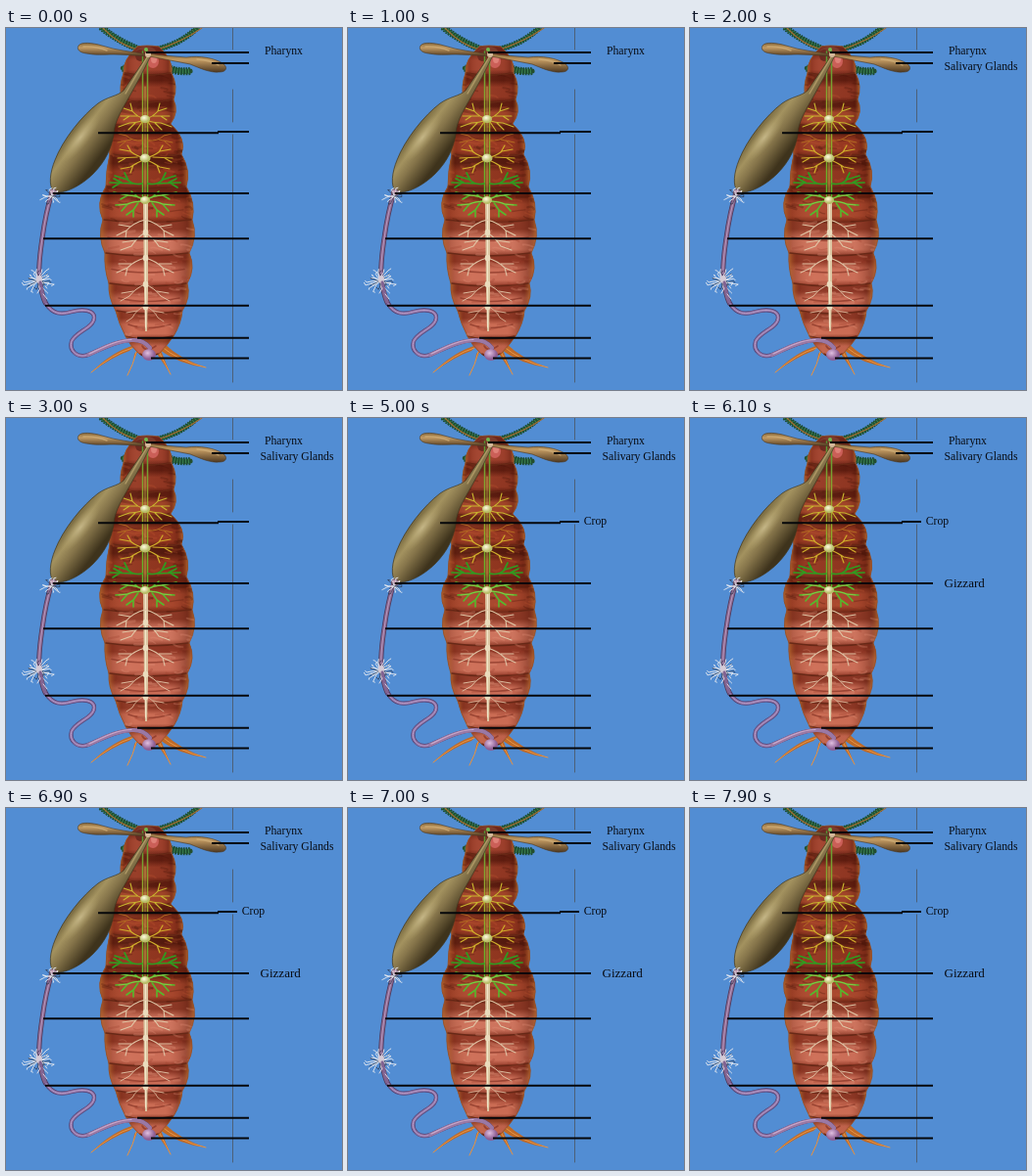
Write an HTML page that moves like this. It is 343 by 370 pixels and loops after 8000 ms.

```html
<!DOCTYPE html>
<html lang="en">
<head>
<meta charset="utf-8">
<title>Insect anatomy</title>
<style>
html, body { margin: 0; width: 100%; height: 100%; overflow: hidden; background: #528dd3; }
svg { display: block; width: 343px; height: 370px; }
path { stroke-linecap: round; stroke-linejoin: round; }
text { font: 11.7px "Liberation Serif", "Times New Roman", serif; fill: #080c14; }
</style>
</head>
<body>
<svg viewBox="0 0 343 370" xmlns="http://www.w3.org/2000/svg">
  <defs>
    <linearGradient id="side" x1="0" x2="1" y1="0" y2="0">
      <stop offset="0" stop-color="#b5682c" stop-opacity=".85"/>
      <stop offset=".09" stop-color="#7a2a14" stop-opacity=".3"/>
      <stop offset=".3" stop-color="#e08060" stop-opacity=".12"/>
      <stop offset=".75" stop-color="#a04028" stop-opacity=".05"/>
      <stop offset=".92" stop-color="#5c1c0c" stop-opacity=".4"/>
      <stop offset="1" stop-color="#b5682c" stop-opacity=".85"/>
    </linearGradient>
    <linearGradient id="sac" gradientUnits="userSpaceOnUse" x1="68" y1="100" x2="101" y2="125">
      <stop offset="0" stop-color="#6d5f38"/>
      <stop offset=".3" stop-color="#a3925f"/>
      <stop offset=".55" stop-color="#85744a"/>
      <stop offset="1" stop-color="#3e331c"/>
    </linearGradient>
    <radialGradient id="shine">
      <stop offset="0" stop-color="#d0c294" stop-opacity=".75"/>
      <stop offset="1" stop-color="#b3a26c" stop-opacity="0"/>
    </radialGradient>
    <linearGradient id="gland" x1="0" x2="0" y1="0" y2="1">
      <stop offset="0" stop-color="#8c6c3c"/>
      <stop offset=".35" stop-color="#c29a62"/>
      <stop offset="1" stop-color="#4e3820"/>
    </linearGradient>
    <linearGradient id="cord" gradientUnits="userSpaceOnUse" x1="0" y1="20" x2="0" y2="185">
      <stop offset="0" stop-color="#4e9a36"/>
      <stop offset=".45" stop-color="#a3a82c"/>
      <stop offset="1" stop-color="#48b526"/>
    </linearGradient>
    <radialGradient id="node" cx=".4" cy=".35">
      <stop offset="0" stop-color="#fffbe0"/>
      <stop offset="1" stop-color="#b9bd68"/>
    </radialGradient>
    <radialGradient id="end" cx=".4" cy=".35">
      <stop offset="0" stop-color="#e0bfe0"/>
      <stop offset="1" stop-color="#8d5f95"/>
    </radialGradient>
    <clipPath id="trunk"></clipPath>
  </defs>
  <g id="art"></g>
  <g id="leaders" stroke="#05070a" stroke-width="1.9"></g>
  <g id="labels"></g>
</svg>
<script>
const byId = id => document.getElementById(id);
let seed = 17;
const rnd = () => (seed = (seed * 16807) % 2147483647) / 2147483647;
const span = (a, b) => a + (b - a) * rnd();

const out = [];
const fill = (d, c, extra = '') => out.push(`<path d="${d}" fill="${c}" ${extra}/>`);
const line = (d, c, w, extra = '') =>
  out.push(`<path d="${d}" fill="none" stroke="${c}" stroke-width="${w}" ${extra}/>`);
const ball = (x, y, rx, ry, c) =>
  out.push(`<ellipse cx="${x}" cy="${y}" rx="${rx}" ry="${ry}" fill="${c}"/>`);

// Feathery green appendages
function feather(d, w) {
  line(d, '#24502f', w * .65);
  line(d, '#1c4c30', w, 'style="stroke-linecap:butt" stroke-dasharray="1.7 1"');
  line(d, '#3c8050', w * .55, 'style="stroke-linecap:butt" stroke-dasharray="1 1.9"');
}
feather('M97 -1Q112 12 136 22', 7);
feather('M152 22Q178 17 196 -1', 6);
feather('M119 41Q127 43 139 35', 7);
feather('M153 35Q170 46 188 44', 8);
line('M134 22Q115 17 99 0', '#a86c32', 1.1);
line('M152 23Q180 14 200 0', '#a86c32', 1.1);

// Tail spikes
function spike(x0, y0, cx, cy, x1, y1, w) {
  fill(`M${x0 - w} ${y0 + w}Q${cx} ${cy + w} ${x1} ${y1}Q${cx} ${cy - w} ${x0 + w} ${y0 - w}Z`, '#c06a26');
  line(`M${x0} ${y0}Q${cx} ${cy} ${x1} ${y1}`, '#e3954a', 1);
}
spike(129, 327, 109, 333, 87, 352, 3);
spike(158, 325, 177, 341, 204, 347, 3);
spike(133, 331, 130, 344, 124, 355, 2);
spike(156, 331, 163, 344, 168, 354, 2);

// Body rings: bottom y, inner left/right, bulge left/right, light, dark
const rings = [
  [19, 134, 156],
  [46, 120, 169, 119, 171, '#9c3f2c', '#6b2417'],
  [73, 118, 171, 115, 176, '#8f3622', '#5a1a0e'],
  [98, 107, 168, 112, 177, '#a04429', '#54180d'],
  [129, 106, 179, 101, 185, '#963720', '#54180c'],
  [162, 102, 184, 102, 189, '#8c331d', '#4e170c'],
  [196, 99, 190, 91, 194, '#a8472d', '#66200f'],
  [230, 101, 187, 93, 196, '#cf7660', '#8a3826'],
  [261, 105, 185, 100, 194, '#cd705a', '#8c3524'],
  [289, 112, 180, 104, 189, '#cb6e58', '#883424'],
  [315, 122, 171, 115, 179, '#cc6e56', '#8a3624'],
  [333, 136, 156, 126, 165, '#c0634c', '#8c4024']
];
let clip = '';
for (let i = rings.length - 1; i > 0; i--) {
  const [y0, l0, r0] = rings[i - 1], [y, l, r, bl, br, light, dark] = rings[i];
  const m = (y0 + y) / 2, sag = i > 1 ? 6 : 4;
  const d = `M${l0} ${y0}Q${bl} ${m} ${l} ${y}Q143 ${y + sag} ${r} ${y}Q${br} ${m} ${r0} ${y0}Q143 ${y0 - 2} ${l0} ${y0}Z`;
  clip += `<path d="${d}"/>`;
  out.push(`<linearGradient id="ring${i}" x1="0" x2="0" y1="0" y2="1">
    <stop offset="0" stop-color="${dark}"/><stop offset=".28" stop-color="${dark}"/>
    <stop offset=".5" stop-color="${light}"/><stop offset=".82" stop-color="${light}"/>
    <stop offset="1" stop-color="${dark}"/></linearGradient>`);
  fill(d, `url(#ring${i})`);
  fill(d, 'url(#side)', 'stroke="#94512a" stroke-width=".9"');
  line(`M${l + 1} ${y}Q143 ${y + sag} ${r - 1} ${y}`, '#5a1c10', 1.3, 'opacity=".75"');
  if (i > 6) line(`M${l + 3} ${m + 1}Q143 ${m + 8} ${r - 3} ${m + 1}`, '#7c2c1e', 1.6, 'opacity=".6"');
}
byId('trunk').innerHTML = clip;

// Soft mottling on the skin
out.push('<g clip-path="url(#trunk)">');
for (let i = 0; i < 210; i++) {
  const x = span(98, 188), y = span(46, 318), low = y > 196;
  const c = rnd() < .5 ? (low ? '#e3927a' : '#b9532f') : (low ? '#993f2e' : '#45120a');
  line(`M${x} ${y}q${span(2, 6)} ${span(-2, 3)} ${span(5, 13)} ${span(-2, 3)}`, c, span(1, 3), 'opacity=".28"');
}
out.push('</g>');

// Head
ball(143, 24, 10, 5, '#7c3c2c');
ball(137, 28, 5, 6, '#6c2a20');
ball(150, 34, 6, 7, '#cb5f58');
ball(151, 32, 3, 4, '#df8178');

// Nerve cords and mirrored branches
line('M139.5 24V178', 'url(#cord)', 1.5);
line('M144.5 24V178', 'url(#cord)', 1.5);
line('M142 60V178', '#cfcf5c', .7);
function pair(y, color, w, paths) {
  for (const s of [1, -1])
    out.push(`<g transform="translate(142 ${y}) scale(${s} 1)">` + paths.map(d =>
      `<path d="${d}" fill="none" stroke="${color}" stroke-width="${w}"/>`).join('') + '</g>');
}
pair(93, '#c9b62e', 1.1, [
  'M0 0Q8 -2 13 -8L22 -11M13 -8L15 -16M8 -3L25 -3M16 -3L22 1',
  'M0 1Q9 4 16 4L27 8M10 4L17 11M3 3L9 12'
]);
pair(115, '#b46b22', 1, ['M3 0Q13 1 19 -5L27 -7M14 -1L28 2M20 1L26 6']);
pair(133, '#d0ae2a', 1.2, [
  'M0 0Q9 -2 15 -7L26 -9M14 -6L18 -13M8 -1L28 0M20 0L27 4',
  'M0 1Q9 5 15 9L25 11M12 7L15 15'
]);
pair(157, '#2f9c20', 1.7, [
  'M3 2Q12 4 18 -2L31 -6M17 -1L21 -9M11 2L36 1M24 1L32 -3M25 1L33 6'
]);
pair(176, '#55b92c', 1.6, [
  'M0 0Q9 -5 17 -5L32 -8M18 -5L25 -1M8 -4L14 -9',
  'M0 1Q12 1 18 4L30 5M18 4L24 11M6 1L12 10L19 15M12 10L12 17'
]);
pair(176, '#a4d65a', .6, ['M0 0Q9 -5 17 -5L28 -7', 'M0 1Q12 1 18 4L27 5']);

// Pale lower cord
fill('M140 176L145 176L145 270L144 310L142 310L141 270Z', '#dcc6a2');
line('M142.5 180V306', '#f3e5c8', 1);
pair(206, '#e0c6a6', 1.1, [
  'M0 -10Q12 -7 19 1L29 6M15 -3L27 -5M19 1L20 9',
  'M0 3Q9 9 14 17L25 21M10 11L23 13'
]);
pair(235, '#dfc0a2', 1.1, ['M0 0Q11 3 18 10L29 15M14 6L27 6M18 10L20 18']);
pair(262, '#debb9e', 1, ['M0 0Q10 4 16 12L25 17M12 7L24 9']);
pair(284, '#d9b094', .9, ['M0 0Q9 4 13 12L19 16M8 5L19 7']);
for (const [y, r] of [[93, 5], [133, 5.5], [176, 5]]) ball(142, y, r, r * .8, 'url(#node)');
for (const y of [209, 235, 262, 285]) ball(142.5, y, 2.8, 3.2, '#eadbbd');

// Salivary glands
const leftGland = 'M145 29Q122 27 110 27C99 27 92 28 82 26C75 25 72 22 74 18C77 14 88 15 98 18C113 23 128 24 145 27Z';
const rightGland = 'M145 26Q166 29 184 30C198 28 213 31 221 36C227 40 225 45 218 45C208 46 198 41 188 37Q168 33 146 29Z';
fill(leftGland, 'url(#gland)', 'stroke="#4a3822" stroke-width=".6"');
fill(rightGland, 'url(#gland)', 'stroke="#4a3822" stroke-width=".6"');
line('M79 19Q90 18 103 23', '#d3b27c', 1.4, 'opacity=".7"');
line('M195 32Q209 33 217 38', '#d3b27c', 1.4, 'opacity=".7"');

// Crop
const crop = 'M145 27Q131 48 120 64C113 70 104 70 94 77C78 89 58 114 50 135C45 147 43 162 49 167C58 171 77 161 89 149C102 136 108 122 110 108C111 94 120 81 126 70Q137 51 147 30Z';
fill(crop, 'url(#sac)', 'stroke="#40351f" stroke-width=".7"');
out.push('<ellipse cx="76" cy="112" rx="9" ry="31" fill="url(#shine)" transform="rotate(38 76 112)"/>');
line('M144 30Q133 48 122 67', '#b29b68', 1.3);
ball(145, 27, 3, 3, '#d4b89a');
ball(143, 22, 2, 2, '#71b84c');

// Intestine
const gut = 'M47 168C41 187 39 200 37 215C34 235 33 244 34 256C36 269 38 278 41 282';
const coil = 'M41 282C48 293 57 293 67 290C78 287 90 288 90 296C90 306 72 310 67 320C64 330 73 338 84 334C98 328 112 320 128 319Q140 318 147 327';
line(gut, '#4b3656', 5);
line(gut, '#89668f', 3.6);
line(gut, '#b795b9', 1.1);
line(coil, '#51406e', 4.2);
line(coil, '#8a70a6', 3);
line(coil, '#c0a1c8', .9);
line('M84 334C98 328 112 320 128 319Q140 318 147 327', '#9a78a4', 4);
line('M85 333C98 327 112 319 128 318.5', '#c9a9cb', 1.2);
ball(146, 334, 7, 6, 'url(#end)');
ball(48, 168, 4, 3.5, '#806079');
ball(47, 167, 1.7, 1.4, '#c5a0b5');

// Fine tubules
function tuft(cx, cy, n, reach, squash) {
  for (let i = 0; i < n; i++) {
    const a = i / n * Math.PI * 2 + span(-.2, .2), r = span(.45, 1) * reach;
    const x = Math.cos(a) * r, y = Math.sin(a) * r * squash;
    line(`M${cx} ${cy}q${x * .4 + span(-3, 3)} ${y * .5 + span(-3, 3)} ${x} ${y}l${span(-3, 3)} ${span(-3, 3)}`,
      i % 4 ? '#e8eaf0' : '#2c3448', i % 4 ? .9 : .7);
  }
}
tuft(47, 172, 13, 12, .8);
tuft(33, 258, 28, 21, .72);
ball(34, 257, 3, 4, '#d5cbd6');
line('M35 260Q37 270 40 280', '#826391', 3);
line('M35 266l-3 5M38 272l4 5', '#e8e4ee', .9);
byId('art').innerHTML = out.join('');

// Pointer lines: x, y, end x
const pointers = [
  [143, 25, 248], [210, 36, 248], [94, 107.3, 217], [216, 106, 236],
  [48, 169, 248], [38, 215.3, 248], [40, 283.7, 248], [134, 316.7, 248], [148, 337.5, 248]
];
const rule = (x, y, x2, id = '') => `<path ${id} d="M${x} ${y}H${x2}" style="stroke-linecap:butt"/>`;
byId('leaders').innerHTML =
  '<path d="M231.5 0V22M231.5 63V96M231.5 109V362" stroke="#4c6079" stroke-width="1"/>' +
  pointers.map(p => rule(...p)).join('') + rule(235, 106, 248, 'id="stub"');

// Labels: text, x, baseline, size, time shown
const labels = [
  ['Pharynx', 264, 27, 11.7, 0],
  ['Salivary Glands', 259.5, 43.3, 11.7, 2000],
  ['Crop', 240.7, 109.3, 11.7, 4100],
  ['Gizzard', 259.6, 173, 13, 5900]
];
const loop = 8000;
function switchAt(el, time, from, to) {
  const offset = time / loop;
  el.animate([
    { opacity: from, offset: 0 }, { opacity: from, offset },
    { opacity: to, offset }, { opacity: to, offset: 1 }
  ], { duration: loop, iterations: Infinity });
}
byId('labels').innerHTML = labels.map(([t, x, y, size]) =>
  `<text x="${x}" y="${y}" style="font-size:${size}px">${t}</text>`).join('');
[...byId('labels').children].forEach((el, i) => labels[i][4] && switchAt(el, labels[i][4], 0, 1));
switchAt(byId('stub'), 4100, 1, 0);
</script>
</body>
</html>
```
